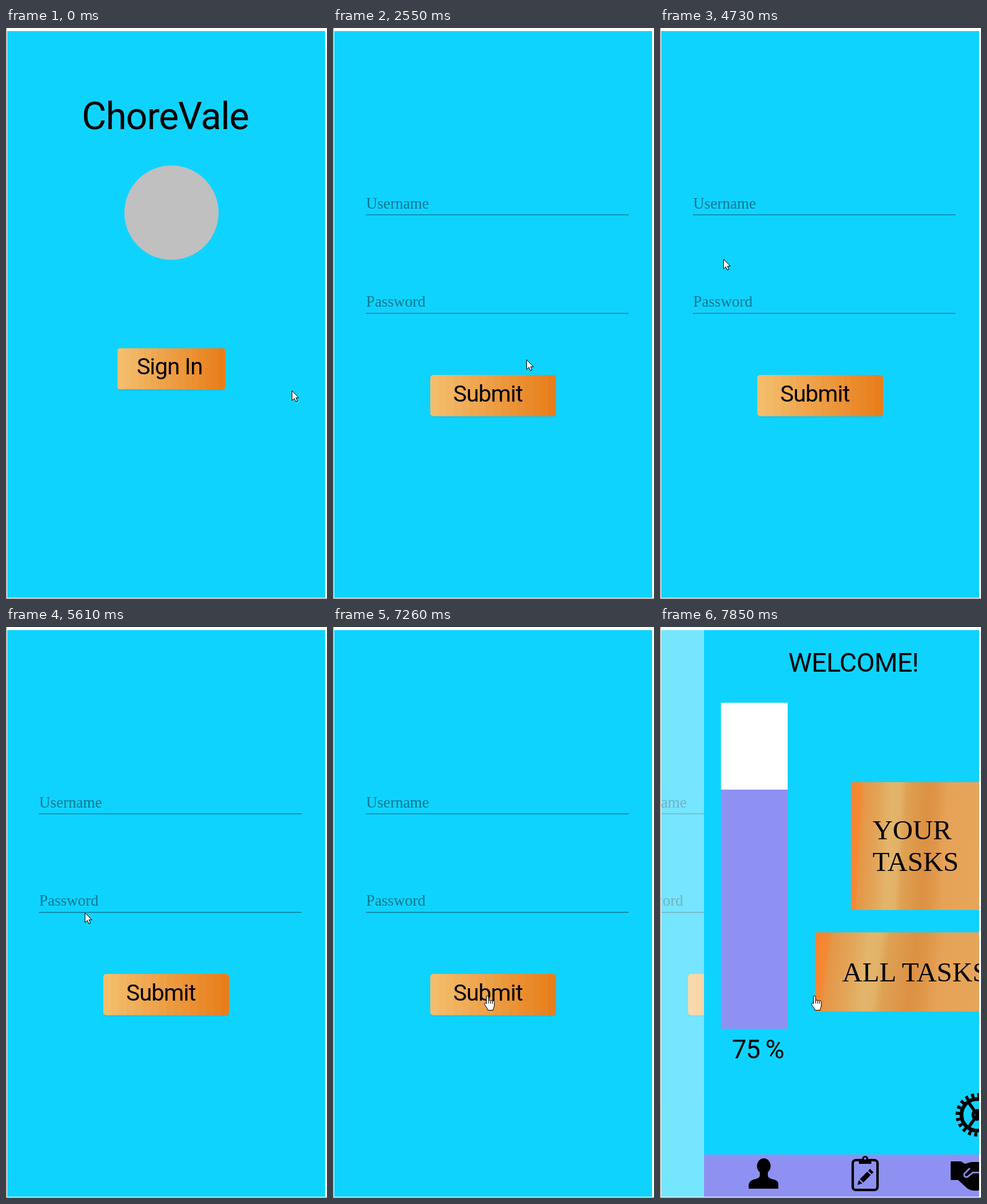
Animation of 518x920 px, one loop 8000 ms. Source, as an HTML page:

```html
<!DOCTYPE html>
<html lang="en">
<head>
<meta charset="utf-8">
<title>Sign-in flow</title>
<style>
  html, body { margin: 0; width: 100%; height: 100%; overflow: hidden; background: #fff; }
  svg { display: block; width: 518px; height: 920px; }
  .sans { font-family: Roboto, "Open Sans", sans-serif; }
  .serif { font-family: "Liberation Serif", "Noto Serif", serif; }
  .title { font-size: 61px; letter-spacing: -1px; }
  .label { font-size: 37px; letter-spacing: -.8px; }
  .head { font-size: 43px; letter-spacing: -.6px; }
  .count { font-size: 42px; letter-spacing: -1.2px; }
  .field { font-size: 25px; fill: #000; fill-opacity: .44; }
  .task { font-size: 45px; }
  .sky { fill: #0fd3ff; }
  .violet { fill: #8f91f2; }
  .line { fill: none; stroke: #000; }
</style>
</head>
<body>
<svg viewBox="0 0 518 920" xmlns="http://www.w3.org/2000/svg">
  <defs>
    <clipPath id="screen"><rect x="2" y="5" width="513" height="913"/></clipPath>
    <linearGradient id="amber"></linearGradient>
    <linearGradient id="wood" x1="0" y1="0" x2="1" y2=".05">
      <stop offset="0" stop-color="#f58430"/>
      <stop offset=".07" stop-color="#f58833"/>
      <stop offset=".09" stop-color="#e69646"/>
      <stop offset=".2" stop-color="#e2a65a"/>
      <stop offset=".28" stop-color="#e3b56c"/>
      <stop offset=".34" stop-color="#e2b268"/>
      <stop offset=".38" stop-color="#dea153"/>
      <stop offset=".52" stop-color="#dc9143"/>
      <stop offset=".58" stop-color="#de9648"/>
      <stop offset=".66" stop-color="#e6a358"/>
      <stop offset="1" stop-color="#e8a65b"/>
    </linearGradient>
  </defs>

  <rect width="518" height="920" fill="#fff"/>
  <path d="M.5 0V919.5H518" class="line" style="stroke:#8a8a8a"/>

  <g clip-path="url(#screen)">
    <g id="home">
      <rect class="sky" x="2" y="5" width="513" height="913"/>
      <text class="sans title" x="257" y="163" text-anchor="middle">ChoreVale</text>
      <circle cx="267" cy="297.5" r="76" fill="#c0c0c0"/>
      <rect x="181" y="519" width="173" height="66" rx="4" fill-opacity=".05"/>
      <rect x="180" y="516" width="174" height="66" rx="4" fill="url(#amber)"/>
      <text class="sans label" x="264" y="558" text-anchor="middle">Sign In</text>
    </g>

    <g id="login">
      <rect class="sky" x="2" y="5" width="513" height="913"/>
      <text class="serif field" x="53.5" y="291">Username</text>
      <path d="M53 301H477" class="line" stroke-width="2" stroke-opacity=".28"/>
      <text class="serif field" x="53.5" y="449">Password</text>
      <path d="M53 459.7H477" class="line" stroke-width="1.4" stroke-opacity=".4"/>
      <rect x="158" y="562" width="202" height="66" rx="5" fill-opacity=".05"/>
      <rect x="157" y="559" width="203" height="66.5" rx="5" fill="url(#amber)"/>
      <text class="sans label" x="250" y="602" text-anchor="middle">Submit</text>
    </g>

    <g id="welcome">
      <rect class="sky" y="5" width="513" height="913"/>
      <text class="sans head" x="136" y="72">WELCOME!</text>
      <rect x="27.5" y="122" width="107.5" height="140" fill="#fff"/>
      <rect class="violet" x="27.5" y="262" width="107.5" height="385.5"/>
      <text class="sans count" x="45" y="695">75 %</text>

      <rect x="237" y="250" width="240" height="206" fill="url(#wood)"/>
      <text class="serif task"><tspan x="272" y="342">YOUR</tspan><tspan x="272" y="393">TASKS</tspan></text>
      <rect x="179" y="492" width="318" height="127.5" fill="url(#wood)"/>
      <text class="serif task" x="223" y="571">ALL TASKS</text>

      <g transform="translate(441 786)" class="line">
        <circle r="25.5" stroke-width="6"/>
        <circle r="31" stroke-width="8" pathLength="40" stroke-dasharray="1 1"/>
        <path d="M-14 -20L14 20M-14 20L14 -20M8 0H25" stroke-width="5"/>
        <circle r="7" stroke-width="5"/>
      </g>

      <rect class="violet" y="850" width="513" height="68"/>
      <g id="person">
        <ellipse cx="96.5" cy="868.5" rx="11" ry="12.5"/>
        <path d="M72 905v-6q1-7 9-9q9-2 9-6v-7h13v7q0 4 9 6q9 2 8 9v6z"/>
      </g>
      <g id="clipboard">
        <rect class="line" x="240" y="859" width="40" height="48" rx="5" stroke-width="4"/>
        <path d="M250 865v-8h5a5 5 0 0 1 10 0h5v8z"/>
        <circle class="violet" cx="260" cy="856.5" r="1.8"/>
        <path d="M247.500 899l2.500-8 5.500 5.500zM251.500 889.500l12-12 5.500 5.500-12 12zM265 876l3-3 5.500 5.500-3 3z"/>
      </g>
      <g id="handshake">
        <path d="M398 861h17l6 4 10-3h17l8 3 6-4h17v25h-9l-18 18q-8 5-16 4q-8 0-14-6l-12-11h-12z"/>
        <path d="M452 879h-18l-9 7q-6 1-5-5l9-9" class="line" style="stroke:#8f91f2" stroke-width="2.500"/>
      </g>
    </g>
  </g>

  <g id="pointer" fill="#fff" stroke="#000" stroke-linejoin="round">
    <path id="arrow" d="M.5 .5V16.200L4.200 12.800 6.700 18 9.200 17 6.900 11.800H11.500z"/>
    <path id="hand" d="M-1.500 12V1a1.800 1.800 0 0 1 3.600 0V7.500a1.600 1.600 0 0 1 3.200 .3a1.600 1.600 0 0 1 3.100 .7a1.500 1.500 0 0 1 2.900 .8V15c0 3-2 4-2 7.500H1C.5 19-2 17.500-4.300 13.500c-1.200-2.300 .8-3.600 2.800-1.500zM2.100 7.500v4M5.300 8v4M8.400 8.700v3.300"/>
  </g>
</svg>

<script>
const LOOP = 8000, LOGIN_AT = 2550, SLIDE_AT = 7700, SLIDE_STEP = 150;
const LEFT = 2, WIDTH = 513;
const $ = id => document.getElementById(id);
const show = (id, on) => $(id).setAttribute('display', on ? 'inline' : 'none');
const move = (id, x, y = 0) => $(id).setAttribute('transform', `translate(${x} ${y})`);

// The pointer jumps from point to point, one jump per step.
const moves = [
  { at: 0, step: 1, path: [[461, 584]] },
  { at: 500, step: 150, path: [[385, 530], [293, 482]] },
  { at: 950, step: 145, path: [[326, 496], [357, 514], [348, 526], [329, 532], [312, 534]] },
  { at: 3140, step: 142, path: [[300, 500], [270, 430], [230, 350], [190, 290], [152, 269], [118, 287], [110, 300], [115, 309]] },
  { at: 4300, step: 144, path: [[108, 328], [104, 350], [102, 372], [103, 392], [106, 408], [110, 422], [113, 432], [115, 438]] },
  { at: 5460, step: 150, path: [[118, 450], [127, 460], [150, 448], [172, 434], [195, 428], [212, 436], [219, 451]] },
  { at: 6530, step: 146, path: [[219, 478], [220, 503], [224, 528], [232, 556], [241, 580], [249, 595]] }
];

const signIn = { x: 180, y: 516, w: 174, h: 66 };
const submit = { x: 157, y: 559, w: 203, h: 66 };
const inside = (b, x, y) => x >= b.x && x <= b.x + b.w && y >= b.y && y <= b.y + b.h;

function pointerAt(t) {
  const { at, step, path } = moves.filter(m => m.at <= t).pop();
  return path[Math.min(path.length - 1, Math.floor((t - at) / step))];
}

function slideAt(t) {
  if (t < SLIDE_AT) return 0;
  return t < SLIDE_AT + SLIDE_STEP ? 0.3 : 0.865;
}

function buildBands(count) {
  const from = [243, 189, 108], to = [232, 126, 27];
  let stops = '';
  for (let i = 0; i < count; i++) {
    const k = i / (count - 1);
    const rgb = from.map((c, j) => Math.round(c + (to[j] - c) * k));
    for (const edge of [i, i + 1])
      stops += `<stop offset="${edge / count}" stop-color="rgb(${rgb})"/>`;
  }
  $('amber').innerHTML = stops;
}

function draw(t) {
  const onLogin = t >= LOGIN_AT;
  show('home', !onLogin);
  show('login', onLogin);

  // The old page drifts a quarter as far as the new one and fades to half.
  const p = slideAt(t);
  move('login', -0.252 * WIDTH * p);
  $('login').setAttribute('opacity', 1 - p / 2);
  show('welcome', p > 0);
  move('welcome', Math.round(LEFT + WIDTH * (1 - p)));

  const [x, y] = pointerAt(t);
  const over = inside(onLogin ? submit : signIn, x, y);
  move('pointer', x, y);
  show('arrow', !over);
  show('hand', over);
}

const start = performance.now();
function tick() {
  draw((performance.now() - start) % LOOP);
  requestAnimationFrame(tick);
}

buildBands(16);
draw(0);
requestAnimationFrame(tick);
</script>
</body>
</html>
```
